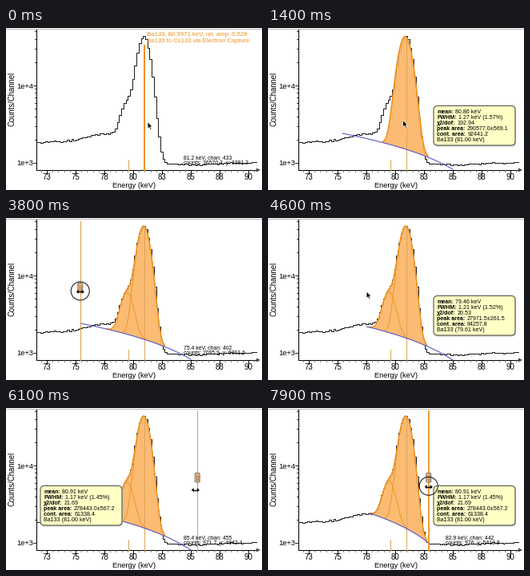
A matplotlib script for the animation above (8 s loop, 320x203 px).

```python
import numpy as np
import matplotlib.pyplot as plt
from matplotlib.animation import FuncAnimation
from matplotlib.patches import Circle, FancyBboxPatch, Polygon

W, H, DPI = 320, 203, 64
PT = 72 / DPI  # points per pixel
STEP, FRAMES = 100, 80
ORANGE, FILL, TAN, BLUE = "#f0921e", "#fbb668", "#dca45c", "#5858c8"
AXIS_Y = 178

plt.rcParams["font.family"] = "Liberation Sans"
fig = plt.figure(figsize=(W / DPI, H / DPI), dpi=DPI, facecolor="white")
ax = fig.add_axes([0, 0, 1, 1])


def x_of(kev):
    return 159 + (kev - 80) * 14.4


def y_of(counts):
    return 169 - 97 * np.log10(np.asarray(counts) / 1000)


def level_of(y):
    return 10 ** (3 + (169 - y) / 97)


def ease(t, start, end):
    p = np.clip((t - start) / (end - start), 0, 1)
    return p * p * (3 - 2 * p)


def gauss(x, mean, sigma, amp):
    return amp * np.exp(-0.5 * ((x - mean) / sigma) ** 2)


# Peaks as mean, sigma and height in pixels and counts
SINGLE = (171.4, 7.7, 41500)
MAIN = (172.1, 7.15, 42000)
SIDE = (151.3, 7.1, 4300)

BASE = np.array([(38, 143.5), (75, 141.5), (90, 139.5), (105, 135.5),
                 (120, 132.5), (132, 133), (150, 143), (175, 153), (190, 161),
                 (198, 169), (215, 170.5), (240, 171.5), (270, 169.5),
                 (300, 169), (314, 168)])


def spectrum(x):
    base = level_of(np.interp(x, BASE[:, 0], BASE[:, 1]))
    return base + gauss(x, *MAIN) + gauss(x, *SIDE)


BIN_X = np.arange(38, 314, 2.72)
BIN_Y = y_of(spectrum(BIN_X + 1.36))
BIN_Y = BIN_Y + np.random.default_rng(4).normal(0, 0.55, BIN_X.size)

# Pointer stops: time, energy, level
STOPS = [(0, 81.2, 3381.2), (1100, 81.2, 3381.2), (1900, 79.35, 3966),
         (2500, 79.35, 3966), (3400, 75.4, 6301.6), (3900, 75.4, 6301.6),
         (4300, 77.45, 6220), (4700, 77.45, 6220), (5200, 85.0, 5100),
         (5300, 85.0, 5100), (5500, 85.4, 4942.4), (6600, 85.4, 4942.4),
         (7400, 82.9, 5413.8), (8000, 82.9, 5413.8)]
READINGS = {433: 36570.3, 402: 2095.9, 455: 971.7, 442: 976}

TIP_LABELS = ["mean:", "FWHM:", "χ2/dof:", "peak area:", "cont. area:"]
TIP_FIRST = ["80.86 keV", "1.27 keV (1.57%)", "192.94", "290577.0±569.1",
             "92441.2", "Ba133 (81.00 keV)"]
TIP_SIDE = ["79.46 keV", "1.21 keV (1.52%)", "20.53", "27971.5±261.5",
            "84257.8", "Ba133 (79.61 keV)"]
TIP_MAIN = ["80.91 keV", "1.17 keV (1.45%)", "21.69", "278443.0±567.2",
            "61338.4", "Ba133 (81.00 keV)"]


def pointer(t):
    for (t0, e0, v0), (t1, e1, v1) in zip(STOPS, STOPS[1:]):
        if t < t1:
            p = ease(t, t0, t1)
            return e0 + (e1 - e0) * p, y_of(v0) + (y_of(v1) - y_of(v0)) * p


def line(xs, ys, color="black", width=1.0, z=2, **kw):
    ax.plot(xs, ys, color=color, lw=width * PT, zorder=z, **kw)


def polygon(points, z=2, face="black", edge="none", width=0):
    ax.add_patch(Polygon(points, fc=face, ec=edge, lw=width * PT, zorder=z))


def rounded(x, y, w, h, radius, z, face, edge="none", width=0):
    style = f"round,pad=0,rounding_size={radius}"
    ax.add_patch(FancyBboxPatch((x, y), w, h, boxstyle=style, zorder=z,
                                fc=face, ec=edge, lw=width * PT))


def text(x, y, s, size, color="black", z=8, **kw):
    kw.setdefault("va", "baseline")
    return ax.text(x, y, s, fontsize=size * PT, color=color, zorder=z, **kw)


def text_width(s, size, weight):
    probe = text(0, 0, s, size, weight=weight)
    width = probe.get_window_extent().width
    probe.remove()
    return width


LABEL_WIDTHS = [text_width(s, 7.1, "bold") for s in TIP_LABELS]


def draw_axes():
    line([0, W], [0.5, 0.5], "#b8b8b8")
    line([37.5, 37.5], [2, AXIS_Y])
    line([37.5, 315], [AXIS_Y, AXIS_Y])
    polygon([(313, 175.5), (318, 178), (313, 180.5)], face="#444444")
    for k in range(39):
        x = 37.5 + 7.2 * k - 0.9
        if 38 < x < 312:
            line([x, x], [AXIS_Y, AXIS_Y + 2], "#555555", 0.8)
    for kev, label in zip(np.arange(72.5, 91, 2.5), "73 75 78 80 83 85 88 90".split()):
        x = x_of(kev)
        line([x, x], [AXIS_Y, AXIS_Y + 4])
        text(x, 190.3, label, 9.8, ha="center")
    for decade in (1e3, 1e4):
        for k in range(1, 10):
            y = y_of(decade * k)
            if 3 < y < AXIS_Y:
                line([34 if k == 1 else 35.5, 37.5], [y, y], width=0.8)
    text(34.5, 75.5, "1e+4", 9.4, ha="right")
    text(34.5, 172.5, "1e+3", 9.4, ha="right")
    text(160, 199.5, "Energy (keV)", 9.2, ha="center")
    text(8, 89, "Counts/Channel", 9.5, ha="center", va="center", rotation=90)


def draw_fit(t):
    p, q = ease(t, 3900, 4300), ease(t, 6600, 7400)
    if t < 1100:
        ends = np.array([94, 2710, 231, 807])
    elif t < 3900:
        ends = np.array([93, 2407, 231, 827])
    else:
        ends = np.array([93, 2407, 231, 827]) * (1 - p) + np.array([123, 2190, 231, 807]) * p
        ends = ends * (1 - q) + np.array([127.5, 2407, 203, 954]) * q
    x0, c0, x1, c1 = ends

    def continuum(x):
        return c0 + (c1 - c0) * (x - x0) / (x1 - x0)

    def shape(peaks, fill, width):
        lo = max(x0, min(m - 3.6 * s for m, s, _ in peaks))
        hi = min(x1, max(m + 3.7 * s for m, s, _ in peaks))
        x = np.linspace(lo, hi, 160)
        bottom = continuum(x)
        top = y_of(bottom + sum(gauss(x, *pk) for pk in peaks))
        if fill:
            ax.fill_between(x, top, y_of(bottom), color=FILL, lw=0, alpha=0.93, zorder=4)
        line(x, top, ORANGE, width, 5)

    if t < 2000:
        shape([SINGLE], True, 1.7)
    elif t < 2600:
        shape([SINGLE], True, 1.6)
        shape([SIDE], True, 1.6)
    else:
        shape([MAIN, SIDE], True, 1.4)
        shape([MAIN], False, 0.9)
        shape([SIDE], False, 0.9)
    x = np.linspace(x0, x1, 60)
    early = t < 1100
    line(x, y_of(continuum(x)), ORANGE if early else BLUE, 1.7 if early else 1.1, 6)


def draw_tip(left, values):
    rounded(left + 1, 98.5, 102, 50, 5, 7, "#cccccc")
    rounded(left, 97.5, 102, 49.5, 5, 7.1, "#ffffc6", "#55554a", 1.1)
    for k, value in enumerate(values):
        x, y = left + 4, 106.6 + 7.15 * k
        if k < len(TIP_LABELS):
            text(x, y, TIP_LABELS[k], 7.1, weight="bold")
            x += LABEL_WIDTHS[k] + 2
        text(x, y, value, 7.1)


def draw_info(kev, y):
    chan = round(402 + (kev - 75.4) * 5.3)
    counts = READINGS.get(chan, round(float(spectrum(x_of(kev))), 1))
    text(222, 163.6, f"{kev:.1f} keV, chan: {chan}", 6.9)
    text(222, 170.6, f"counts: {counts:.6g}, y: {level_of(y):.1f}", 6.9)


def draw_arrow(x, y):
    pts = np.array([(0, 0), (0, 8.5), (2, 6.8), (3.4, 9.8), (4.8, 9.2), (3.5, 6.2), (6, 6)])
    polygon(pts + (x + 0.8, y), 11, edge="white", width=0.7)


def draw_edge(edge, x, y, pressed, strong):
    line([edge, edge], [4, AXIS_Y], ORANGE if strong else TAN, 1.8 if strong else 1.2, 6.5)
    rounded(edge - 3, 81.5, 6, 11.5, 1.2, 9, "#f0b070", "#777777", 1)
    for dx in (-1, 1):
        line([edge + dx] * 2, [84, 91], "#8a7050", 0.7, 9.1)
    if pressed:
        ax.add_patch(Circle((x, y), 11.5, fill=False, ec="#222222", lw=1.1 * PT, zorder=10))
    line([x - 3, x + 3], [y + 1, y + 1], "black", 1.4, 11)
    for side in (-1, 1):
        polygon([(x + 5 * side, y + 1), (x + 2 * side, y - 1.6),
                 (x + 2 * side, y + 3.6)], 11)


def draw(i):
    t = i * STEP
    ax.clear()
    ax.set(xlim=(0, W), ylim=(H, 0))
    ax.axis("off")
    draw_axes()
    line(BIN_X, BIN_Y, "#1c1c1c", 1.0, 3, drawstyle="steps-post")

    fitted = t >= 400
    mark = x_of(80.9971)
    line([mark, mark], [12 if fitted else 22, AXIS_Y],
         TAN if fitted else ORANGE, 1.0 if fitted else 2.0, 5.5)
    line([x_of(79.61)] * 2, [165, AXIS_Y], TAN, 1, 5.5)
    if fitted:
        draw_fit(t)
    if t < 1100:
        text(176, 10.5, "Ba133, 80.9971 keV, rel. amp. 0.528", 7.7, ORANGE)
        text(176, 18, "Ba133 to Cs133 via Electron Capture", 7.7, ORANGE)

    kev, y = pointer(t)
    x = x_of(kev)
    if t < 200 or 3100 <= t < 4300 or t >= 5400:
        draw_info(kev, y)

    if 1300 <= t < 3000:
        draw_tip(207, TIP_FIRST)
    elif 4400 <= t < 4900:
        draw_tip(207, TIP_SIDE)
    elif 5000 <= t < 7500:
        draw_tip(43, TIP_MAIN)
    elif t >= 7600:
        draw_tip(207, TIP_MAIN)

    if 3400 <= t < 4300:
        draw_edge(x, x, y, t >= 3700, False)
    elif t >= 5700:
        pressed = t >= 6600
        draw_edge(x + 2.4 * (1 - ease(t, 6600, 7400)), x, y, pressed, pressed)
    else:
        draw_arrow(x, y)
    return []


anim = FuncAnimation(fig, draw, frames=FRAMES, interval=STEP, repeat=True,
                     repeat_delay=0, init_func=lambda: draw(0), blit=False)
plt.show()
```
